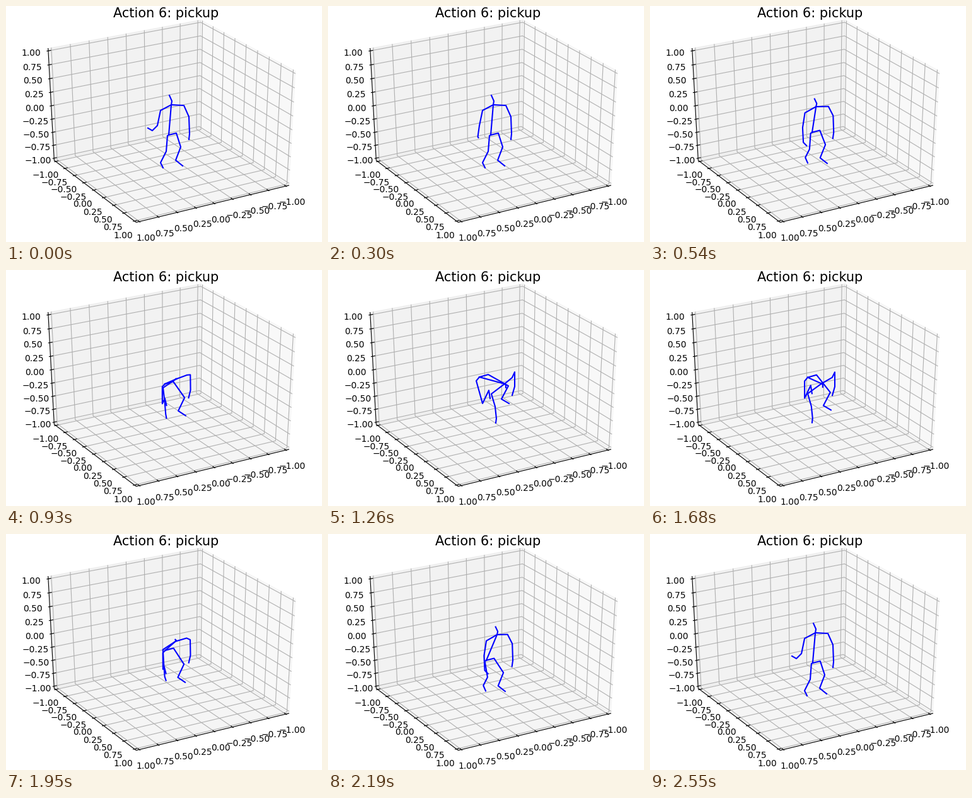
Animation of 501 by 375 pixels, one loop 2580 ms. Source, as a matplotlib script:

```python
import numpy as np
import matplotlib.pyplot as plt
from matplotlib.animation import FuncAnimation

W, H = 501, 375
STEP, FRAMES = 30, 86
ELEV, AZIM, DIST = np.radians(30), np.radians(60), 10
SCALE, CENTRE = np.array([2682, -1990]), np.array([259.4, 177.3])
DELTA = 2 / 12
EDGE = 1 + DELTA / 4
LABEL = EDGE + 0.1486

# Limbs in order: spine (head, neck, chest, base), left and right arm
# (shoulder, elbow, wrist, tip), left and right leg (hip, knee, ankle, foot)
STAND = np.array([
    [(259, 142), (263, 151), (262, 157), (258, 205)],
    [(245, 166), (240, 190), (241, 214), (247, 219)],
    [(282, 158), (290, 176), (291, 203), (290, 212)],
    [(256, 206), (254, 231), (245, 249), (249, 257)],
    [(270, 202), (277, 224), (269, 245), (280, 254)],
], float)
CROUCH = np.array([
    [(274, 187), (274, 183), (272, 181), (250, 170)],
    [(250, 197), (256, 217), (258, 236), (257, 243)],
    [(289, 171), (293, 162), (293, 185), (289, 199)],
    [(245, 176), (245, 203), (255, 182), (257, 195)],
    [(264, 166), (286, 194), (275, 215), (287, 222)],
], float)
SPINE, LEFT_ARM, RIGHT_ARM, LEFT_LEG, RIGHT_LEG = range(5)


def ease(t, start, end):
    s = np.clip((t - start) / (end - start), 0, 1)
    return s * s * (3 - 2 * s)


def pulse(t, peak, width):
    return np.exp(-((t - peak) / width) ** 2)


def pose(t):
    """Joints at time t: bend down, reach with a twist, stand up again."""
    bend = ease(t, 330, 1290) - ease(t, 1620, 2350)
    lift = 1 - ease(t, 30, 500) + ease(t, 2200, 2550)
    twist = pulse(t, 1260, 200)
    lean = twist + 0.6 * pulse(t, 2190, 180)

    joints = STAND + (CROUCH - STAND) * bend
    joints[LEFT_ARM, 2:] += lift * np.array([(-9, -16), (-22, -25)])
    # The trunk leans to one side while the pelvis goes to the other
    joints[SPINE, :3, 0] += 8 * lean
    joints[LEFT_ARM, :, 0] += 9 * lean
    joints[RIGHT_ARM, :, 0] += 3 * lean
    joints[SPINE, 3, 0] -= 10 * lean
    joints[LEFT_LEG:, 0, 0] -= 10 * lean
    joints[LEFT_LEG, 1:, 1] += 9 * twist
    joints[RIGHT_LEG, 1:, 1] -= 10 * twist
    return joints


def project(points):
    """Perspective view of data points, in stage pixels."""
    x, y, z = np.asarray(points, float).T / 2
    ce, se, ca, sa = np.cos(ELEV), np.sin(ELEV), np.cos(AZIM), np.sin(AZIM)
    right = y * ca - x * sa
    up = z * ce - se * (x * ca + y * sa)
    depth = DIST - ce * (x * ca + y * sa) - z * se
    return CENTRE + SCALE * np.stack([right, up], axis=1) / depth[:, None]


def line(points, color, z):
    ax.plot(*project(points).T, color=color, lw=0.8, zorder=z)


def pane(points, grey):
    ax.fill(*project(points).T, fc=str(grey), ec=str(grey), alpha=0.5,
            lw=1, zorder=1)


def label(point, value):
    x, y = project([point])[0]
    ax.text(x, y - 0.5, f"{value:.2f}".replace("-", "\u2212"), fontsize=10,
            ha="center", va="top", zorder=5)


plt.rcParams["font.family"] = "DejaVu Sans"
fig = plt.figure(figsize=(5.01, 3.75), dpi=100, facecolor="white")
ax = fig.add_axes([0, 0, 1, 1])
ax.set_xlim(0, W)
ax.set_ylim(H, 0)
ax.axis("off")

lo, hi = -EDGE, EDGE
pane([(lo, lo, lo), (lo, hi, lo), (lo, hi, hi), (lo, lo, hi)], 0.95)
pane([(lo, lo, lo), (hi, lo, lo), (hi, lo, hi), (lo, lo, hi)], 0.90)
pane([(lo, lo, lo), (hi, lo, lo), (hi, hi, lo), (lo, hi, lo)], 0.925)

GRID = "#b0b0b0"
outer, inner = EDGE + 0.1 * DELTA, EDGE - 0.2 * DELTA
for t in np.linspace(-1, 1, 9):
    line([(t, hi, lo), (t, lo, lo), (t, lo, hi)], GRID, 2)
    line([(hi, t, lo), (lo, t, lo), (lo, t, hi)], GRID, 2)
    line([(hi, lo, t), (lo, lo, t), (lo, hi, t)], GRID, 2)
    line([(t, inner, lo), (t, outer, lo)], "black", 4)
    line([(inner, t, lo), (outer, t, lo)], "black", 4)
    line([(inner, lo, t), (outer, lo, t)], "black", 4)
    label((t, LABEL, -LABEL), t)
    label((LABEL, t, -LABEL), t)
    label((LABEL, -LABEL, t), t)
line([(hi, lo, hi), (hi, lo, lo), (hi, hi, lo), (lo, hi, lo)], "black", 3)

ax.text(253.4, 18.5, "Action 6: pickup", fontsize=15, ha="center",
        va="baseline")

bones = [ax.plot([], [], color="blue", lw=1.5, zorder=6)[0]
         for _ in STAND]


def update(frame):
    joints = pose(max(frame, 1) * STEP)
    chest, base = joints[SPINE, 2:]
    roots = [joints[SPINE, 0], chest, chest, base, base]
    for bone, root, limb in zip(bones, roots, joints):
        bone.set_data(*np.vstack([root, limb]).T)
    return bones


anim = FuncAnimation(fig, update, frames=FRAMES, interval=STEP,
                     repeat=True, repeat_delay=0)
plt.show()
```
